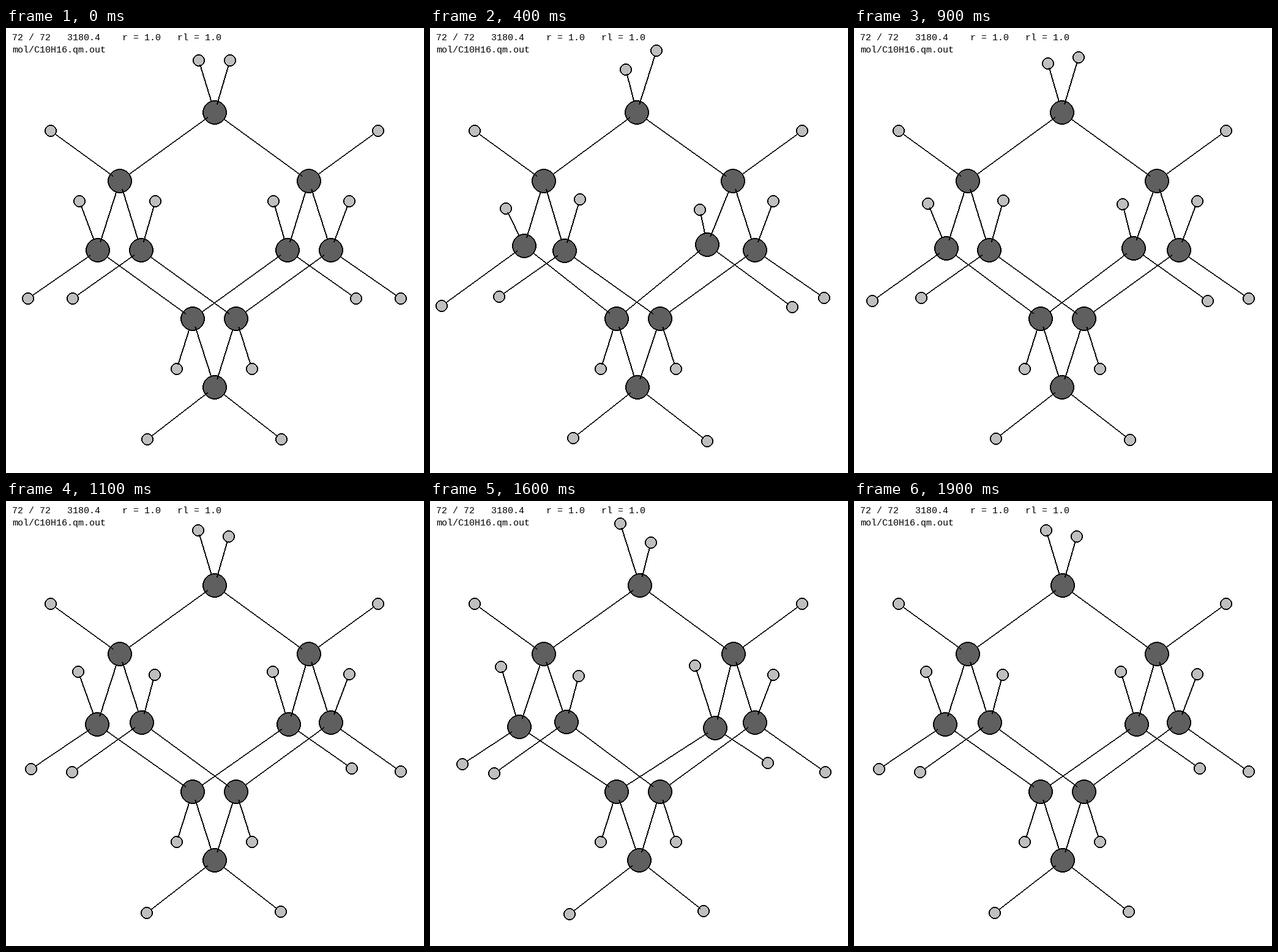
A matplotlib script for the animation above (2 s loop, 683 px wide and 727 px high).

```python
import numpy as np
import matplotlib.pyplot as plt
from matplotlib.animation import FuncAnimation

W, H, DPI = 683, 727, 64
FRAMES, INTERVAL = 20, 100
PX = 72 / DPI  # points per pixel
GREY_C, GREY_H = 95, 191

# rest x, rest y, swing x, swing y, depth layer
CARBONS = {
    "A": (341.01, 138.5, -2.6, 0, 0),
    "B": (186.5, 250.5, 0, 0, 0),
    "C": (495.6, 250.5, -0.5, 0, 0),
    "D": (150.3, 363.01, 4, -7, -1),
    "E": (221.7, 363.2, -1.5, 1.7, 1),
    "F": (460.01, 363.2, -7, -8.7, -1),
    "G": (531.5, 363.05, 0, 0.3, 1),
    "J": (305.5, 475.5, 0, 0, -1),
    "K": (376.5, 475.5, 0, 0, 1),
    "Z": (341.01, 587.5, -1.9, 0, 0),
}
HYDROGENS = [
    ("A", (315.6, 53.1, 4.7, 16.2, -1)),
    ("A", (366.3, 53.2, 4.8, -16.3, 1)),
    ("B", (73.5, 168.5, 0, 0, 0)),
    ("C", (608.5, 168.5, 0, 0, 0)),
    ("D", (120.37, 283.2, 4.5, 12.5, -2)),
    ("D", (36.1, 442.3, -17.8, 12.5, -1)),
    ("E", (244.2, 283.5, 1, -3, 2)),
    ("E", (109.5, 442.5, 4.3, -3.2, 1)),
    ("F", (437.7, 283.6, 4.4, 14.7, -2)),
    ("F", (572.3, 442.35, 20.8, 14.8, -1)),
    ("G", (561.5, 283.6, 0, -0.5, 2)),
    ("G", (645.5, 442.5, -0.7, -0.9, 1)),
    ("J", (279.5, 557.5, 0, 0, -2)),
    ("K", (402.5, 557.5, 0, 0, 2)),
    ("Z", (231.2, 672.6, 3.2, -2.6, 0)),
    ("Z", (450.2, 672.6, 3.2, 2.6, 0)),
]
FRAMEWORK = "AB AC BD BE CF CG DJ EK FJ GK JZ KZ"

names = list(CARBONS)
atoms = np.array(list(CARBONS.values()) + [a for _, a in HYDROGENS])
rest, swing, layer = atoms[:, :2], atoms[:, 2:4], atoms[:, 4]
n_c = len(names)
radii = np.where(np.arange(len(atoms)) < n_c, 20, 10)
bonds = [(names.index(a), names.index(b)) for a, b in FRAMEWORK.split()]
bonds += [(names.index(p), n_c + i) for i, (p, _) in enumerate(HYDROGENS)]

# painter's order: far layers first, left side slightly nearer;
# a bond lies between its two atoms
rank = np.argsort(np.argsort(layer * 1000 - rest[:, 0]))
parts = [(rank[i], (i,)) for i in range(len(atoms))]
parts += [((rank[a] + rank[b]) / 2, (a, b)) for a, b in bonds]
parts.sort()


def paint_disc(img, center, r, grey):
    """Filled disc with a hard-edged outline two pixels wide along an axis."""
    y, x = np.abs(np.mgrid[-r:r, -r:r] + 0.5)
    major, minor = np.maximum(x, y), np.minimum(x, y)
    edge = major - np.sqrt(np.maximum((r - 1) ** 2 - minor ** 2, 0))
    cx, cy = center.astype(int)
    box = img[cy - r:cy + r, cx - r:cx + r]
    box[edge < 1] = 0
    box[edge < -1] = grey


def paint_line(img, p, q):
    """Hard-edged line, two pixels wide across its minor axis."""
    if abs(q[1] - p[1]) > abs(q[0] - p[0]):
        img, p, q = img.T, p[::-1], q[::-1]
    if p[0] > q[0]:
        p, q = q, p
    u = np.arange(np.ceil(p[0] - 0.5), np.ceil(q[0] - 0.5)).astype(int)
    v = p[1] + (q[1] - p[1]) / (q[0] - p[0]) * (u + 0.5 - p[0])
    v = np.ceil(v - 1.5).astype(int)
    img[v, u] = 0
    img[v + 1, u] = 0


def paint_bond(img, pos, a, b):
    d = pos[b] - pos[a]
    d /= np.hypot(*d)
    paint_line(img, pos[a] + 0.7 * radii[a] * d, pos[b] - 0.7 * radii[b] * d)


def molecule(k):
    pos = np.floor(rest + swing * np.sin(2 * np.pi * k / FRAMES))
    img = np.full((H, W), 255, np.uint8)
    for _, part in parts:
        if len(part) == 2:
            paint_bond(img, pos, *part)
        else:
            i = part[0]
            paint_disc(img, pos[i], radii[i], GREY_C if i < n_c else GREY_H)
    return img


fig = plt.figure(figsize=(W / DPI, H / DPI), dpi=DPI, facecolor="white")
ax = fig.add_axes([0, 0, 1, 1])
view = ax.imshow(molecule(0), cmap="gray", vmin=0, vmax=255, aspect="auto",
                 interpolation="nearest", extent=(0, W, H, 0))
ax.axis("off")


def label(y, text):
    ax.text(10, y, text, family="Liberation Mono", fontsize=15 * PX,
            color="black", va="baseline")


label(20, "72 / 72   3180.4    r = 1.0   rl = 1.0")
label(40, "mol/C10H16.qm.out")


def draw(k):
    view.set_data(molecule(k))
    return [view]


anim = FuncAnimation(fig, draw, frames=FRAMES, interval=INTERVAL,
                     repeat=True, repeat_delay=0, blit=False)
plt.show()
```
